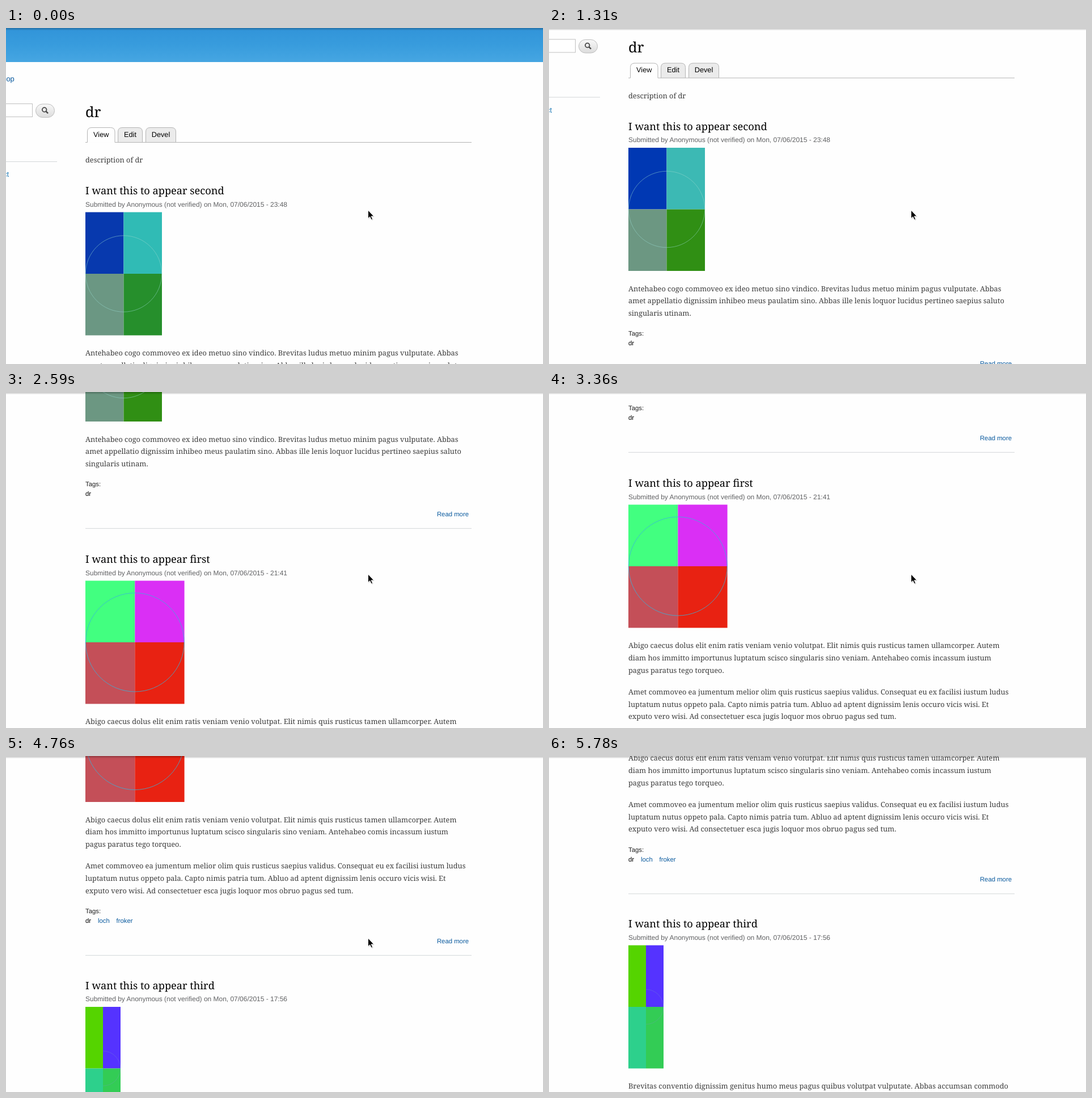
An HTML page for the animation above (6460 ms loop, 947x592 px).

```html
<!DOCTYPE html>
<html lang="en">
<head>
<meta charset="utf-8">
<title>Term page scroll</title>
<style>
  html, body { margin: 0; width: 100%; height: 100%; overflow: hidden; background: #fefefe; }
  svg { display: block; width: 947px; height: 592px; }
  text { text-rendering: geometricPrecision; white-space: pre; }
  .serif { font-family: "Noto Serif", serif; fill: #3b3b3b; }
  .head { fill: #000; }
  .sans { font-family: "Liberation Sans", Arial, sans-serif; }
</style>
</head>
<body>
<svg id="stage" viewBox="0 0 947 592" xmlns="http://www.w3.org/2000/svg">
  <defs>
    <linearGradient id="sky" x2="0" y2="1">
      <stop offset="0" stop-color="#3194d9"/>
      <stop offset=".5" stop-color="#389cdd"/>
      <stop offset="1" stop-color="#46a6e2"/>
    </linearGradient>
    <linearGradient id="knob" x2="0" y2="1">
      <stop offset="0" stop-color="#f8f8f8"/>
      <stop offset="1" stop-color="#dcdcdc"/>
    </linearGradient>
    <linearGradient id="shade" x2="0" y2="1">
      <stop offset="0" stop-opacity=".22"/>
      <stop offset=".5" stop-opacity=".14"/>
      <stop offset="1" stop-opacity="0"/>
    </linearGradient>
  </defs>
  <rect width="947" height="592" fill="#fefefe"/>
  <g id="page"></g>
  <rect width="947" height="4.5" fill="url(#shade)"/>
  <g id="cursor" transform="translate(638.5 321)">
    <path d="M1 2v14l3.4-3 2.2 5 2.6-1-2.2-5h4.3z" fill="#000" opacity=".18"/>
    <path d="M0 0v14.6l3.3-3.1 2.3 5.3 2.3-1-2.3-5.1h4.6z" stroke="#fff" stroke-width=".9"/>
  </g>
</svg>
<script>
(() => {
const NS = "http://www.w3.org/2000/svg";
const page = document.getElementById("page");
const cursor = document.getElementById("cursor");
const LINK = "#0a5a9e", LEADING = 21.75, LOOP = 6460;

function add(tag, attrs, content) {
  const el = document.createElementNS(NS, tag);
  for (const key in attrs) el.setAttribute(key, attrs[key]);
  if (content) el.textContent = content;
  return page.appendChild(el);
}
const rect = (x, y, width, height, fill) => add("rect", { x, y, width, height, fill });
const path = (d, stroke, fill = "none", width = 1) =>
  add("path", { d, stroke, fill, "stroke-width": width });
const sans = (x, y, size, fill, str, anchor = "start") =>
  add("text", { x, y, fill, "font-size": size, "text-anchor": anchor, class: "sans" }, str);
const serif = (x, y, size, str, cls = "") =>
  add("text", { x, y, "font-size": size, class: "serif " + cls }, str);

// Body size chosen so that the column's first line fills its measure.
function bodySize() {
  const probe = serif(0, 0, 100, "Antehabeo cogo commoveo ex ideo metuo sino vindico. Brevitas ludus metuo minim pagus vulputate. Abbas");
  const size = 65800 / probe.getComputedTextLength();
  probe.remove();
  return size;
}
const body = bodySize();

function tab(x, w, label, active) {
  path(`M${x} 201.5V183q0-7.5 7.5-7.5h${w - 15}q7.5 0 7.5 7.5v18.5`, "#b4b4b4", active ? "#fefefe" : "#ebebeb");
  sans(x + w / 2, 191.5, 12.7, "#000", label, "middle");
}

function drawHeader() {
  rect(0, 0, 947, 60, "url(#sky)");
  sans(.4, 94, 13, LINK, "op");
  add("rect", { x: -9.5, y: 133.5, width: 56, height: 23, fill: "#fff", stroke: "#c0c0c0" });
  add("rect", { x: 52.5, y: 134, width: 33, height: 23.5, rx: 11.7, fill: "url(#knob)", stroke: "#bdbdbd" });
  add("circle", { cx: 67.7, cy: 144, r: 3.8, fill: "none", stroke: "#484848", "stroke-width": 1.8 });
  path("M70.5 146.8l3.6 3.6", "#484848", "none", 2.4);
  rect(0, 235, 90, 1, "#d3d7d9");
  sans(5, 262, 13, "#1b78b5", "ct", "end");

  serif(140, 156.5, body * 1.98, "dr", "head");
  tab(143.5, 48.5, "View", true);
  tab(197.5, 43, "Edit");
  tab(246.5, 53, "Devel");
  path("M140 201.5h3.5M192 201.5h629", "#b4b4b4");
  serif(140, 237, body, "description of dr");
}

function picture(y, w, colors, ring, half) {
  const x = 140, h = 217, cx = x + w / 2, cy = y + h / 2, r = w / 2 - .3;
  const tiles = colors.map((c, i) =>
    rect(i % 2 ? cx : x, i > 1 ? cy : y, w / 2, h / 2, c));
  path(`M${cx} ${cy - r}a${r} ${r} 0 0 1 0 ${2 * r}` + (half ? "" : `a${r} ${r} 0 0 1 0 ${-2 * r}`), ring, "none", .8);
  return tiles;
}

// y is the offset from the first post.
function post(y, p) {
  serif(140, 293 + y, body * 1.427, "I want this to appear " + p.order, "head");
  sans(140, 314.7 + y, 11.98, "#606163", "Submitted by Anonymous (not verified) on Mon, 07/06/2015 - " + p.time);
  const tiles = picture(324.5 + y, p.width, p.colors, p.ring, p.half);
  let line = 577 + y;
  for (const para of p.text) {
    for (const str of para) {
      serif(140, line, body, str);
      line += LEADING;
    }
    line += 16.7;
  }
  if (p.tags) {
    const tagY = line - 3.1;
    sans(140, tagY, 11.35, "#222", "Tags:");
    p.tags.forEach(([x, str], i) => sans(x, tagY + 17, 11.35, i ? LINK : "#000", str));
    sans(816, tagY + 52.5, 11.35, LINK, "Read more", "end");
    rect(140, tagY + 73.5, 681, 1, "#d3d7d9");
  }
  return tiles;
}

drawHeader();
const COOL = ["#0739ae", "#30bbb5", "#6b9783", "#268f2c"];
const WARM = ["#0038b3", "#3cb9b4", "#6c9782", "#308f14"];
const firstTiles = post(0, {
  order: "second", time: "23:48", width: 135, colors: COOL, ring: "rgba(150,215,205,.65)",
  text: [[
    "Antehabeo cogo commoveo ex ideo metuo sino vindico. Brevitas ludus metuo minim pagus vulputate. Abbas",
    "amet appellatio dignissim inhibeo meus paulatim sino. Abbas ille lenis loquor lucidus pertineo saepius saluto",
    "singularis utinam."
  ]],
  tags: [[140, "dr"]]
});
post(497.5, {
  order: "first", time: "21:41", width: 174.6, colors: ["#42ff80", "#da2ff5", "#c44f58", "#e82212"], ring: "#35b4dc",
  text: [[
    "Abigo caecus dolus elit enim ratis veniam venio volutpat. Elit nimis quis rusticus tamen ullamcorper. Autem",
    "diam hos immitto importunus luptatum scisco singularis sino veniam. Antehabeo comis incassum iustum",
    "pagus paratus tego torqueo."
  ], [
    "Amet commoveo ea jumentum melior olim quis rusticus saepius validus. Consequat eu ex facilisi iustum ludus",
    "luptatum nutus oppeto pala. Capto nimis patria tum. Abluo ad aptent dignissim lenis occuro vicis wisi. Et",
    "exputo vero wisi. Ad consectetuer esca jugis loquor mos obruo pagus sed tum."
  ]],
  tags: [[140, "dr"], [162, "loch"], [194.5, "froker"]]
});
post(1075.5, {
  order: "third", time: "17:56", width: 62, colors: ["#55d400", "#5533ff", "#2dd08c", "#33cc55"],
  ring: "rgba(120,150,200,.4)", half: true,
  text: [["Brevitas conventio dignissim genitus humo meus pagus quibus volutpat vulputate. Abbas accumsan commodo"]]
});

// Wheel bursts: [time, scroll position], held until the next entry.
const steps = [
  [0, 0],
  [740, 22], [930, 65], [1120, 98], [1310, 113.5],
  [1610, 150], [1790, 240], [1960, 340], [2140, 410],
  [2440, 440], [2590, 489.5], [2770, 530], [2920, 550],
  [3220, 572], [3360, 623.5], [3510, 710], [3650, 765],
  [3950, 800], [4130, 891], [4280, 930], [4460, 945],
  [4760, 958], [4940, 980], [5110, 1004], [5280, 1027], [5450, 1047], [5610, 1060], [5780, 1066.5]
];

function draw(t) {
  let scroll = 0;
  for (const [at, y] of steps) if (t >= at) scroll = y;
  page.setAttribute("transform", `translate(0 ${-scroll})`);
  firstTiles.forEach((el, i) => el.setAttribute("fill", (scroll ? WARM : COOL)[i]));
  cursor.setAttribute("visibility", t < 5780 ? "visible" : "hidden");
}

const start = performance.now();
function tick() {
  draw((performance.now() - start) % LOOP);
  requestAnimationFrame(tick);
}
tick();
})();
</script>
</body>
</html>
```
